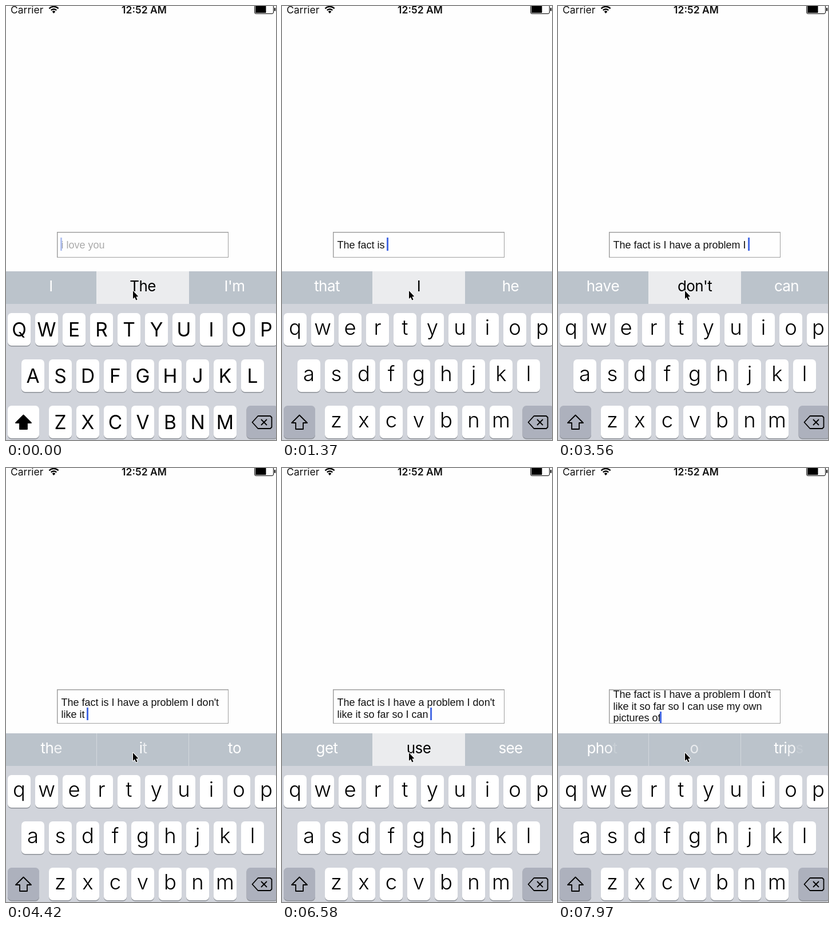
An HTML page with a canvas for the animation above (8000 ms loop, 472 by 759 pixels).

```html
<!DOCTYPE html>
<html lang="en">
<head>
<meta charset="utf-8">
<title>Predictive typing</title>
<style>
html, body { margin: 0; width: 100%; height: 100%; overflow: hidden; background: #fefefe; }
canvas { display: block; }
</style>
</head>
<body>
<canvas id="stage" width="472" height="759"></canvas>
<script>
const ctx = document.getElementById('stage').getContext('2d');
const LOOP = 8000, FADE = 150;
const UI = 'Inter, Roboto, sans-serif';
const FIELD = '18px "Liberation Sans", Arial, sans-serif';
const TEXT_X = 96.5, WRAP = 286;

// [press time, left, tapped word, right, hold time]
const taps = [
  [0, 'I', 'The', "I'm"],
  [340, 'first', 'fact', 'best'],
  [680, 'that', 'is', 'of', 160],
  [1370, 'that', 'I', 'he', 170],
  [1850, "don't", 'have', 'love'],
  [2180, 'been', 'a', 'to'],
  [2500, 'lot', 'problem', 'good'],
  [3060, 'with', 'I', 'and'],
  [3560, 'have', "don't", 'can'],
  [3960, 'know', 'like', 'want'],
  [4330, 'the', 'it', 'to'],
  [4750, 'when', 'so', 'and'],
  [5196, 'much', 'far', 'many'],
  [5550, 'but', 'so', 'and'],
  [5890, 'far', 'I', 'much'],
  [6230, "don't", 'can', 'have'],
  [6580, 'get', 'use', 'see'],
  [6900, 'the', 'my', 'it'],
  [7220, 'phone', 'own', 'hair'],
  [7530, 'and', 'pictures', 'but'],
  [7858, 'photo', 'of', 'trips']
].map(([at, left, word, right, hold = 60]) =>
  ({ at, up: at + hold, word, labels: [left, word, right] }));

const slotX = [78.5, 239, 399.5];
const leaveSpeed = [1.4, 2, 1];
const clamp = v => Math.max(0, Math.min(1, v));

function rect(x, y, w, h, color) {
  ctx.fillStyle = color;
  ctx.fillRect(x, y, w, h);
}

function roundRect(x, y, w, h, r, color) {
  ctx.fillStyle = color;
  ctx.beginPath();
  ctx.roundRect(x, y, w, h, r);
  ctx.fill();
}

function text(str, x, y, font, color, align = 'left') {
  ctx.font = font;
  ctx.fillStyle = color;
  ctx.textAlign = align;
  ctx.fillText(str, x, y);
}

function path(points, close = true) {
  ctx.beginPath();
  points.forEach(([x, y], i) => i ? ctx.lineTo(x, y) : ctx.moveTo(x, y));
  if (close) ctx.closePath();
}

function drawStatus() {
  text('Carrier', 8, 13, '400 17.5px ' + UI, '#111');
  text('12:52 AM', 241.5, 13, '600 17.5px ' + UI, '#111', 'center');
  ctx.strokeStyle = '#000';
  ctx.lineWidth = 2.4;
  for (const r of [6.5, 11]) {
    ctx.beginPath();
    ctx.arc(83.5, 12, r, -Math.PI * 0.76, -Math.PI * 0.24);
    ctx.stroke();
  }
  ctx.fillStyle = '#000';
  ctx.beginPath();
  ctx.moveTo(83.5, 13);
  ctx.arc(83.5, 12, 3.6, -Math.PI * 0.78, -Math.PI * 0.22);
  ctx.fill();
  ctx.lineWidth = 1;
  ctx.beginPath();
  ctx.roundRect(434.5, -1.5, 33, 15, 2.5);
  ctx.stroke();
  rect(436, 0, 18.5, 12, '#000');
  roundRect(469, 3, 2, 6, 1, '#000');
}

function wrapLines(str) {
  const lines = [''];
  for (const word of str.split(/(?<= )/)) {
    const last = lines.length - 1;
    const next = lines[last] + word;
    if (ctx.measureText(next.trimEnd()).width > WRAP) lines.push(word);
    else lines[last] = next;
  }
  return lines;
}

function drawField(typed) {
  ctx.font = FIELD;
  const lines = wrapLines(typed);
  const n = lines.length;
  const top = n > 1 ? 387 : 395, height = n > 1 ? 60 : 45;
  const firstLine = [424, 416, 402][n - 1];
  rect(89, top, 300, height, '#a0a0a0');
  rect(90.5, top + 1.5, 297.5, height - 2.5, '#fefefe');
  ctx.save();
  ctx.beginPath();
  ctx.rect(90, top + 1, 298, height - 2);
  ctx.clip();
  if (!typed) text('i love you', TEXT_X, 424, FIELD, '#aaa');
  lines.forEach((line, i) => text(line, TEXT_X, firstLine + i * 20.5, FIELD, '#111'));
  const caretX = TEXT_X + ctx.measureText(lines[n - 1]).width - 1.5;
  const caretY = [405, 419, 426][n - 1];
  rect(caretX, caretY, 3, n > 1 ? 22 : 23, typed ? '#4569e4' : 'rgba(110,140,230,.5)');
  ctx.restore();
}

// Letters vanish from the end as shown goes from 1 to 0.
function drawLabel(str, x, shown, color) {
  ctx.font = '400 26px ' + UI;
  ctx.textAlign = 'left';
  ctx.fillStyle = color;
  const soft = 1.5;
  const letters = [...str].map((ch, i) => ({
    ch,
    w: ctx.measureText(ch).width - 0.6,
    alpha: clamp(((str.length + soft) * shown - i) / soft)
  }));
  x -= letters.reduce((sum, l) => sum + l.w * (1 + l.alpha) / 2, 0) / 2;
  for (const l of letters) {
    ctx.globalAlpha = l.alpha;
    ctx.fillText(l.ch, x, 499);
    x += l.w;
  }
  ctx.globalAlpha = 1;
}

function drawBar(t, done) {
  const next = taps[done], prev = taps[done - 1];
  const pressed = next && t >= next.at;
  rect(0, 464, 472, 57, '#bbc3cb');
  if (pressed) rect(158, 464, 162, 57, '#ebecee');
  else for (const x of [158, 319]) rect(x, 464, 1, 57, '#d3d8dd');

  const since = prev ? t - prev.up : Infinity;
  const leaving = !pressed && since < FADE;
  const labels = (leaving || !next ? prev : next).labels;
  labels.forEach((str, i) => {
    const shown = pressed ? 1
      : leaving ? 1 - since / FADE * leaveSpeed[i]
      : (since - FADE) / FADE;
    drawLabel(str, slotX[i], clamp(shown), pressed && i === 1 ? '#000' : '#fff');
  });
}

function drawKey(x, y, w, color) {
  roundRect(x, y + 1.5, w, 57, 6.5, '#8b8f96');
  roundRect(x, y, w, 57, 6.5, color);
}

function drawKeyboard(upper) {
  rect(0, 521, 472, 238, '#d1d4db');
  const font = (upper ? '400 33.5px ' : '300 36.5px ') + UI;
  const rows = ['QWERTYUIOP', 'ASDFGHJKL', 'ZXCVBNM'];
  rows.forEach((row, r) => {
    const y = 537 + r * 81, left = [3, 27, 75][r];
    [...row].forEach((ch, i) => {
      const x = left + i * 48;
      drawKey(x, y, 40, '#fff');
      text(upper ? ch : ch.toLowerCase(), x + 20, y + (upper ? 41 : 38), font, '#000', 'center');
    });
  });

  drawKey(3, 699, 55, upper ? '#fff' : '#adb1bd');
  ctx.strokeStyle = ctx.fillStyle = '#000';
  ctx.lineWidth = 1.8;
  ctx.lineJoin = 'round';
  path([[30.5, 715.5], [44, 729], [37, 729], [37, 740], [24, 740], [24, 729], [17, 729]]);
  if (upper) ctx.fill();
  ctx.stroke();

  drawKey(420.5, 699, 55, '#adb1bd');
  ctx.strokeStyle = '#000';
  path([[430.5, 728], [440.5, 717], [462, 717], [464.5, 719.5], [464.5, 736.5], [462, 739], [440.5, 739]]);
  ctx.stroke();
  path([[446, 723], [456, 733]], false);
  ctx.stroke();
  path([[456, 723], [446, 733]], false);
  ctx.stroke();
}

function drawPointer() {
  path([[222, 498], [222, 512], [225, 509.3], [227.4, 514.5], [229.6, 513.5], [227.3, 508.4], [231.3, 508]]);
  ctx.strokeStyle = '#fff';
  ctx.lineWidth = 2;
  ctx.stroke();
  ctx.fillStyle = '#000';
  ctx.fill();
}

function draw(t) {
  const done = taps.filter(tap => t >= tap.up).length;
  let typed = taps.slice(0, done).map(tap => tap.word + ' ').join('');
  if (done === taps.length) typed = typed.trimEnd();
  rect(0, 0, 472, 759, '#fefefe');
  drawStatus();
  drawField(typed);
  drawKeyboard(done === 0);
  drawBar(t, done);
  drawPointer();
}

const start = performance.now();
function tick() {
  draw((performance.now() - start) % LOOP);
  requestAnimationFrame(tick);
}
tick();
</script>
</body>
</html>
```
